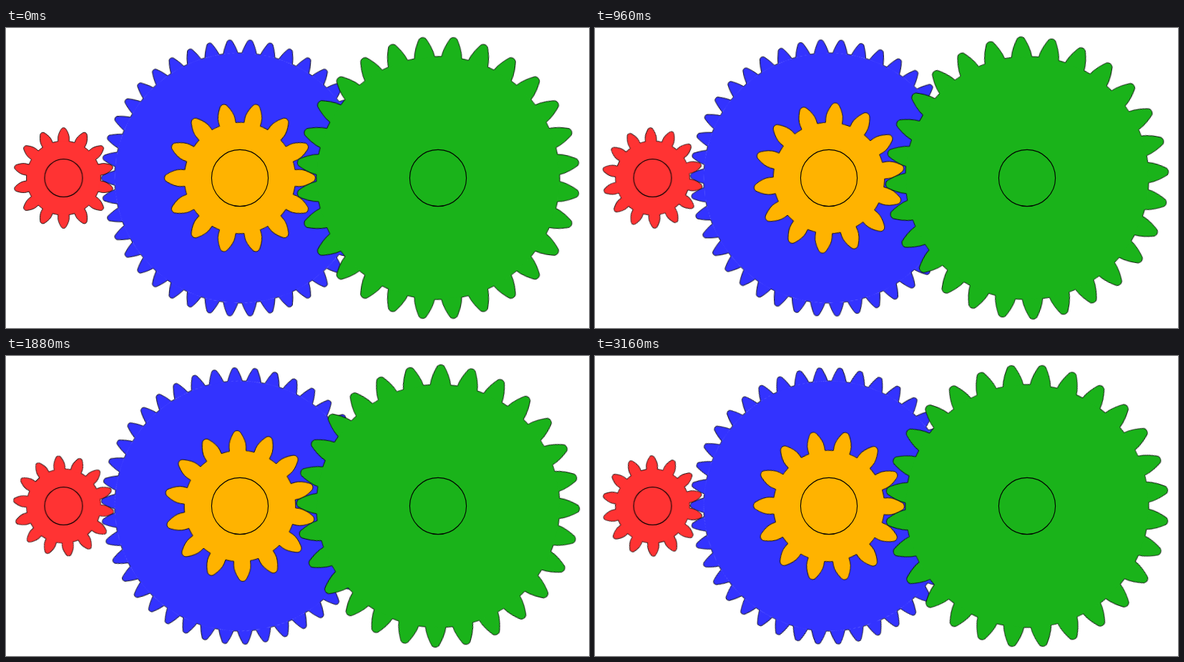
An HTML page without scripts that plays this animation: 815x420 px, repeating every 3.2 s.

```html
<!DOCTYPE html>
<html lang="en">
<head>
<meta charset="utf-8">
<title>Compound gear train</title>
<style>
  html, body { margin: 0; width: 100%; height: 100%; overflow: hidden; background: #fff; }
  svg { display: block; width: 815px; height: 420px; }
  .gear { stroke: #000; stroke-width: .8; }
  .disc { stroke: none; }
  .hub { fill: none; stroke: #000; stroke-width: 1.1; }
  .red { fill: #f33; stroke-width: 1.2; --turn: 77.143deg; }
  .blue { fill: #33f; --turn: -25.714deg; }
  .orange { fill: #ffb300; --turn: -25.714deg; }
  .green { fill: #1ab31a; --turn: 12.857deg; }
  /* each gear advances whole teeth per loop, so the loop closes */
  .spin { animation: spin 3.2s steps(80) infinite; }
  @keyframes spin {
    from { transform: rotate(0deg); }
    to { transform: rotate(var(--turn)); }
  }
</style>
</head>
<body>
<svg viewBox="0 0 815 420">
  <defs>
    <!-- one involute tooth per gear size, pointing up -->
    <path id="t14" d="M-17.32-75.87A77.8 77.8 0 0 1-11.6-76.94L-11.86-82.84L-11.53-87.24L-10.34-91.75L-8.35-96.64L-5.82-101.33L-4.3-103.6Q-2.6-105.5 0-105.5Q2.6-105.5 4.3-103.6L5.82-101.33L8.35-96.64L10.34-91.75L11.53-87.24L11.86-82.84L11.6-76.94A77.8 77.8 0 0 1 17.32-75.87"/>
    <path id="t28" d="M-19.05-169.09A170.2 170.2 0 0 1-14.29-169.56L-12.98-176.52L-10.35-184.38L-7.43-190.86L-4.72-195.94Q-2.8-197.8 0-197.9Q2.8-197.8 4.72-195.94L7.43-190.86L10.35-184.38L12.98-176.52L14.29-169.56A170.2 170.2 0 0 1 19.05-169.09"/>
    <path id="t42" d="M-13.09-174.71A175.2 175.2 0 0 1-10.25-174.9L-8.78-179.79L-6.91-184.75L-4.76-189.44L-3.21-192.37Q-1.9-193.65 0-193.7Q1.9-193.65 3.21-192.37L4.76-189.44L6.91-184.75L8.78-179.79L10.25-174.9A175.2 175.2 0 0 1 13.09-174.71"/>

    <!-- runs of seven teeth -->
    <g id="run14">
      <use href="#t14"/>
      <use href="#t14" transform="rotate(25.714)"/>
      <use href="#t14" transform="rotate(51.429)"/>
      <use href="#t14" transform="rotate(77.143)"/>
      <use href="#t14" transform="rotate(102.857)"/>
      <use href="#t14" transform="rotate(128.571)"/>
      <use href="#t14" transform="rotate(154.286)"/>
    </g>
    <g id="run28">
      <use href="#t28"/>
      <use href="#t28" transform="rotate(12.857)"/>
      <use href="#t28" transform="rotate(25.714)"/>
      <use href="#t28" transform="rotate(38.571)"/>
      <use href="#t28" transform="rotate(51.429)"/>
      <use href="#t28" transform="rotate(64.286)"/>
      <use href="#t28" transform="rotate(77.143)"/>
    </g>
    <g id="run42">
      <use href="#t42"/>
      <use href="#t42" transform="rotate(8.571)"/>
      <use href="#t42" transform="rotate(17.143)"/>
      <use href="#t42" transform="rotate(25.714)"/>
      <use href="#t42" transform="rotate(34.286)"/>
      <use href="#t42" transform="rotate(42.857)"/>
      <use href="#t42" transform="rotate(51.429)"/>
    </g>

    <g id="gear14">
      <circle class="disc" r="77.8"/>
      <use href="#run14"/>
      <use href="#run14" transform="rotate(180)"/>
    </g>
    <g id="gear28">
      <circle class="disc" r="170.2"/>
      <use href="#run28"/>
      <use href="#run28" transform="rotate(90)"/>
      <use href="#run28" transform="rotate(180)"/>
      <use href="#run28" transform="rotate(270)"/>
    </g>
    <g id="gear42">
      <circle class="disc" r="175.2"/>
      <use href="#run42"/>
      <use href="#run42" transform="rotate(60)"/>
      <use href="#run42" transform="rotate(120)"/>
      <use href="#run42" transform="rotate(180)"/>
      <use href="#run42" transform="rotate(240)"/>
      <use href="#run42" transform="rotate(300)"/>
    </g>
  </defs>

  <g transform="translate(80.5 210)">
    <g class="gear red spin"><use href="#gear14" transform="scale(.6675)"/></g>
    <circle class="hub" r="26.5"/>
  </g>
  <g transform="translate(327 210)">
    <g class="gear blue spin"><use href="#gear42" transform="rotate(4.286)"/></g>
    <g class="gear orange spin"><use href="#gear14" transform="rotate(12.857)"/></g>
    <circle class="hub" r="39.6"/>
  </g>
  <g transform="translate(604 210)">
    <g class="gear green spin"><use href="#gear28" transform="rotate(6.429)"/></g>
    <circle class="hub" r="39.6"/>
  </g>
</svg>
</body>
</html>
```
